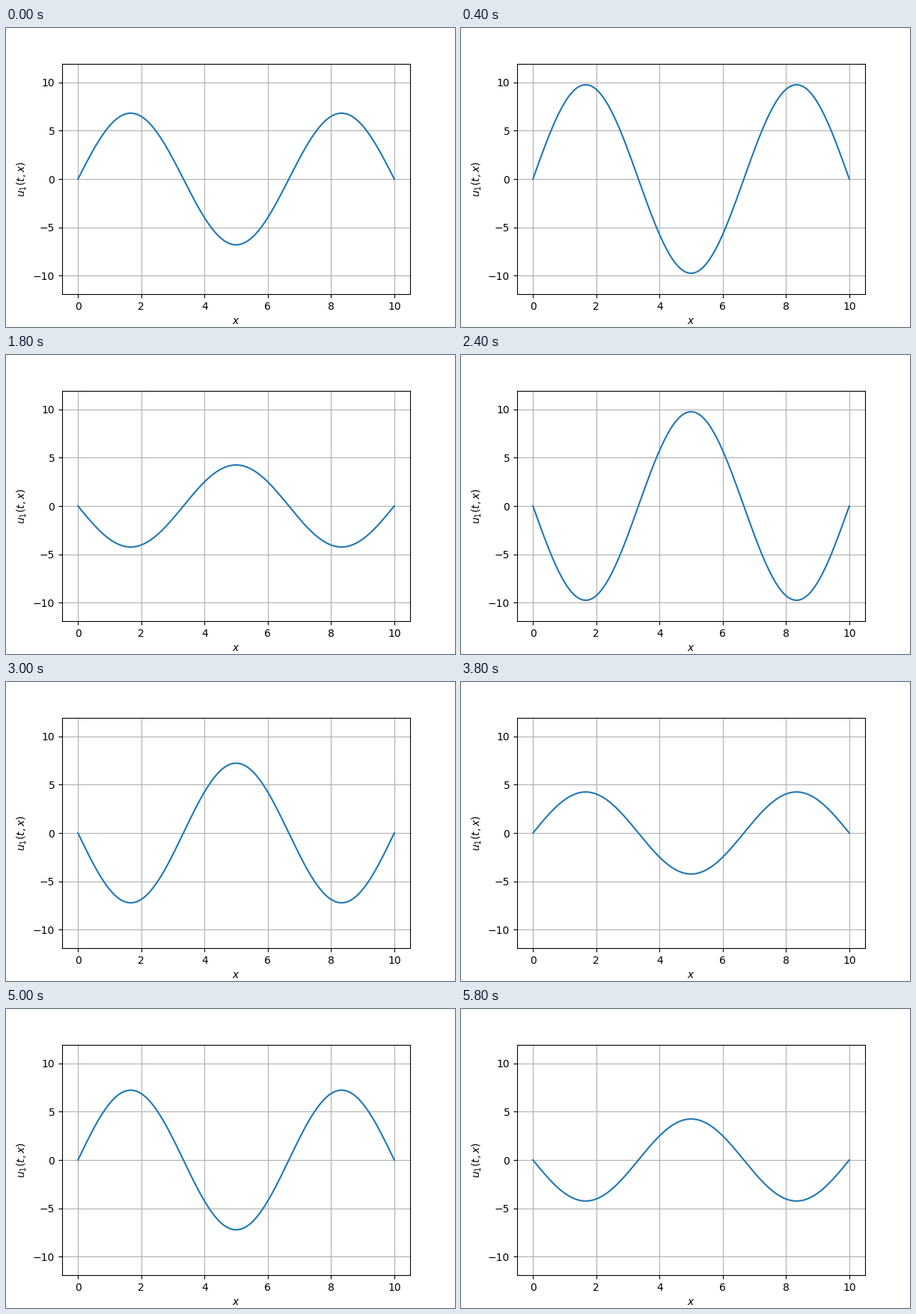
A matplotlib script for the animation above (6000 ms loop, 600x400 px).

```python
import numpy as np
import matplotlib.pyplot as plt
from matplotlib.animation import FuncAnimation

FRAMES = 30
INTERVAL = 200
LENGTH = 10
COS_AMP, SIN_AMP = 6.81, 7.225
OMEGA = np.pi / 10  # phase advance per frame

x = np.linspace(0, LENGTH, 200)
mode = np.sin(3 * np.pi * x / LENGTH)


def amplitude(n):
    return COS_AMP * np.cos(OMEGA * n) + SIN_AMP * np.sin(OMEGA * n)


fig, ax = plt.subplots(figsize=(6, 4), dpi=100)
line, = ax.plot(x, amplitude(0) * mode)
limit = 1.2 * np.hypot(COS_AMP, SIN_AMP)
ax.set_xlim(-0.5, 10.5)
ax.set_ylim(-limit, limit)
ax.set_xlabel("$x$")
ax.set_ylabel("$u_1(t, x)$")
ax.grid(True)


def update(n):
    line.set_ydata(amplitude(n) * mode)
    return line,


anim = FuncAnimation(fig, update, frames=FRAMES, interval=INTERVAL,
                     repeat=True, repeat_delay=0)
plt.show()
```
